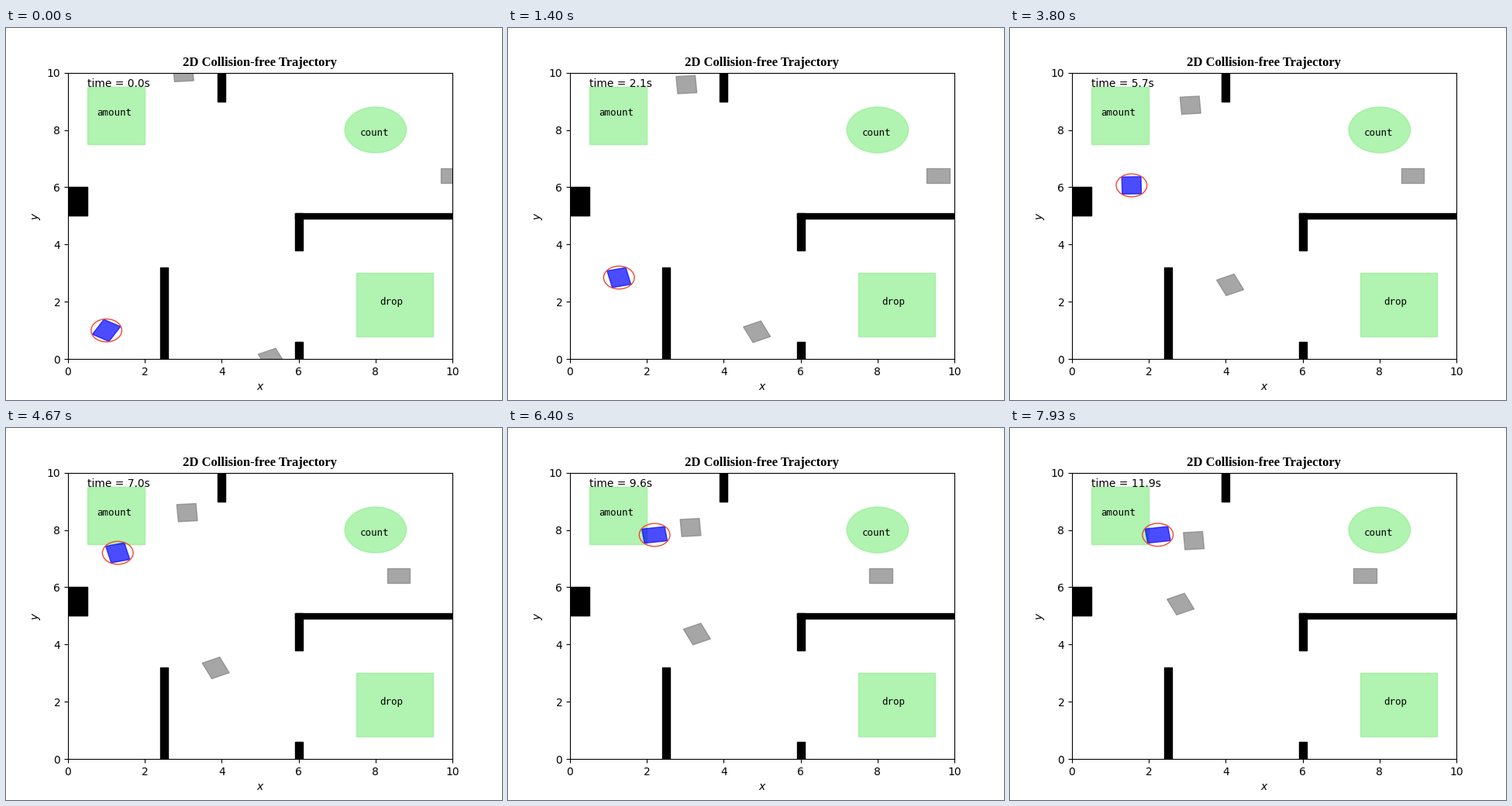
Animation of 640 by 480 pixels, one loop 8000 ms. Source, as a matplotlib script:

```python
import numpy as np
import matplotlib.pyplot as plt
from matplotlib.animation import FuncAnimation
from matplotlib.patches import Circle, Polygon, Rectangle

STEPS = 120
DT = 0.1
SUB = 3  # draws per time step
LOOP_MS = 8000
LENGTH, WIDTH = 0.6, 0.5
CRUISE = 0.9

# Obstacles drift straight ahead: start, heading (rad), speed
OBSTACLES = [(3 + 10j, -1.5, 0.2), (10 + 6.4j, np.pi, 0.2), (5.3 + 0j, 2.0, 0.5)]

# Robot key poses: time, position, heading (deg)
KEYS = [
    (0.0, 1 + 1j, 60),
    (2.1, 1.275 + 2.845j, 103),
    (3.9, 1.39 + 4.45j, 83),
    (5.7, 1.55 + 6.065j, 91),
    (7.0, 1.295 + 7.2j, 104),
    (7.9, 1.21 + 7.7j, 60),
    (9.6, 2.2 + 7.8255j, 8),
    (11.9, 2.232 + 7.83j, 8),
]


def velocity(t, deg):
    """Cruise speed, fading out once the robot reaches its first goal."""
    return CRUISE * np.exp(-1.6 * max(0, t - 7) + 1j * np.radians(deg))


def robot_pose(t):
    """Cubic Hermite path through the key poses; heading follows the tangent."""
    k = max(i for i, key in enumerate(KEYS[:-1]) if key[0] <= t + 1e-9)
    (t0, p0, d0), (t1, p1, d1) = KEYS[k:k + 2]
    span = t1 - t0
    s = (t - t0) / span
    m0, m1 = span * velocity(t0, d0), span * velocity(t1, d1)
    blend = 3 * s**2 - 2 * s**3
    pos = p0 + blend * (p1 - p0) + s * (1 - s) * ((1 - s) * m0 - s * m1)
    slope = (6 * s * (1 - s) * (p1 - p0) + (1 - s) * (1 - 3 * s) * m0
             + s * (3 * s - 2) * m1)
    return pos, np.angle(slope)


def box(pos, heading):
    """Corners of a body centred at pos and turned to its heading."""
    half = complex(LENGTH, WIDTH) / 2
    corners = np.array([half, -half.conjugate(), -half, half.conjugate()])
    turned = pos + corners * np.exp(1j * heading)
    return np.column_stack([turned.real, turned.imag])


def add_body(color):
    return ax.add_patch(Polygon(box(0, 0), color=color, alpha=0.7, lw=1))


def add_rect(x, y, w, h, **style):
    ax.add_patch(Rectangle((x, y), w, h, lw=1, **style))


plt.rcParams["font.family"] = "DejaVu Sans"
fig, ax = plt.subplots(figsize=(6.4, 4.8), dpi=100)
ax.set(xlim=(0, 10), ylim=(0, 10), xlabel="$x$", ylabel="$y$")
ax.set_title("2D Collision-free Trajectory", family="Liberation Serif",
             weight="bold", size=12)

goal = dict(color="lightgreen", alpha=0.7)
add_rect(0.5, 7.5, 1.5, 2, **goal)
add_rect(7.5, 0.8, 2, 2.2, **goal)
ax.add_patch(Circle((8, 8), 0.8, lw=1, **goal))
for x, y, name in [(0.75, 8.5, "amount"), (7.6, 7.8, "count"), (8.1, 1.9, "drop")]:
    ax.text(x, y, name, family="DejaVu Sans Mono", size=9)

add_rect(0, 5, 0.5, 1, color="black")
add_rect(5.9, 4.9, 4.1, 0.2, color="black")
for x, low, high in [(2.5, 0, 3.2), (4, 9, 10), (6, 0, 0.6), (6, 3.8, 5.1)]:
    add_rect(x - 0.1, low, 0.2, high - low, color="black")

movers = [add_body("gray") for _ in OBSTACLES]
robot = add_body("blue")
ring = ax.add_patch(Circle((1, 1), 0.4, fill=False, ec="#f0482c", lw=1))
clock = ax.text(0.5, 9.5, "")


def update(i):
    # Steps land one draw early, so rounding to 10 ms never delays them.
    t = min((i + 1) // SUB, STEPS - 1) * DT
    for patch, (start, heading, speed) in zip(movers, OBSTACLES):
        patch.set_xy(box(start + speed * t * np.exp(1j * heading), heading))
    pos, heading = robot_pose(t)
    robot.set_xy(box(pos, heading))
    ring.set_center((pos.real, pos.imag))
    clock.set_text(f"time = {t:.1f}s")
    return [*movers, robot, ring, clock]


anim = FuncAnimation(fig, update, frames=STEPS * SUB,
                     interval=LOOP_MS / (STEPS * SUB), repeat=True, repeat_delay=0)
plt.show()
```
